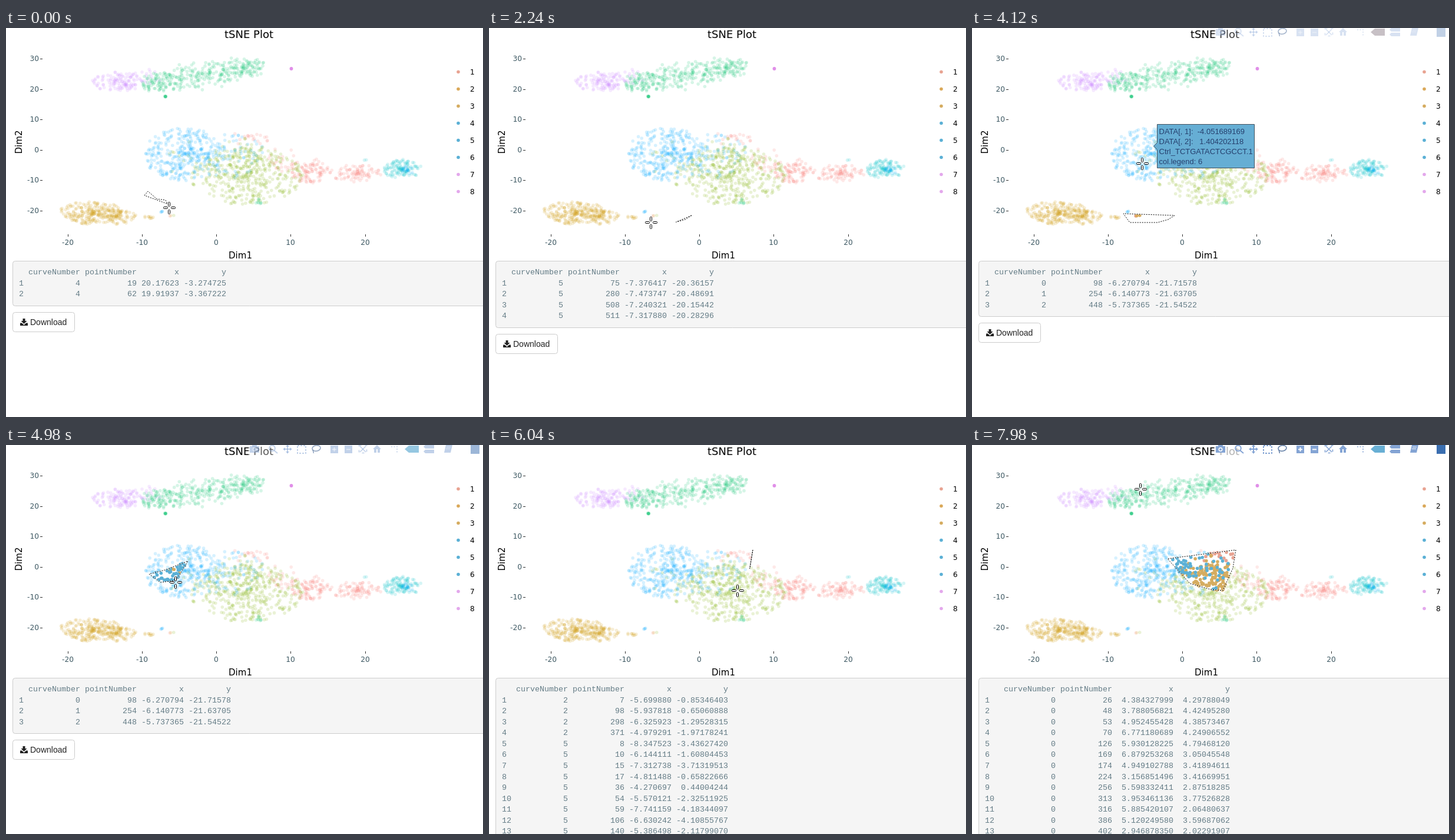
These frames come from a looping animation (810 by 660 pixels, 8 s). An HTML page with a canvas:

```html
<!DOCTYPE html>
<html lang="en">
<head>
<meta charset="utf-8">
<title>tSNE Plot</title>
<style>
  html, body { margin: 0; width: 810px; height: 660px; overflow: hidden; background: #fff; }
  canvas { display: block; }
</style>
</head>
<body>
<canvas id="stage" width="810" height="660"></canvas>
<script>
const ctx = document.getElementById('stage').getContext('2d');
const LOOP = 8000, LAG = 180;
const SANS = '"DejaVu Sans", Verdana, sans-serif';
const ARIAL = '"Liberation Sans", Arial, sans-serif';
const MONO = '"Liberation Mono", "Courier New", monospace';

// Colours per group: faint markers, and the solid ones used for selection and legend
const FAINT = ['', '#F8766D', '#CD9600', '#7CAE00', '#00BE67', '#00BFC4', '#00A9FF', '#C77CFF'];
const SOLID = ['', '#E8A392', '#DAA95A', '#D5AC60', '#5BB0D5', '#5BB0D5', '#5BB0D5', '#E3A8EC', '#E3A8EC'];

const clamp = v => Math.max(0, Math.min(1, v));

// ---------- points, in plot units mapped to pixels ----------
const toX = v => 357.2 + 12.62 * v, toY = v => 206.8 - 5.16 * v;
const fromX = px => (px - 357.2) / 12.62, fromY = px => (206.8 - px) / 5.16;

let seed = 20177;
function rnd() {
  seed = (seed + 0x6D2B79F5) | 0;
  let r = Math.imul(seed ^ (seed >>> 15), 1 | seed);
  r = (r + Math.imul(r ^ (r >>> 7), 61 | r)) ^ r;
  return ((r ^ (r >>> 14)) >>> 0) / 4294967296;
}

// Known points: group, number within the group, x, y
const points = [
  [5, 19, 20.17623, -3.274725], [5, 62, 19.91937, -3.367222],
  [6, 75, -7.376417, -20.36157], [6, 280, -7.473747, -20.48691],
  [6, 508, -7.240321, -20.15442], [6, 511, -7.317880, -20.28296],
  [1, 98, -6.270794, -21.71578], [2, 254, -6.140773, -21.63705], [3, 448, -5.737365, -21.54522]
].map(([g, n, x, y]) => ({ g, n, x, y, px: toX(x), py: toY(y) }));

function dot(g, px, py) {
  points.push({ g, n: Math.floor(rnd() * 520), x: fromX(px), y: fromY(py), px, py });
}
function blob(n, g, cx, cy, rx, ry) {
  while (n--) {
    const a = rnd() * 2 * Math.PI, r = rnd() ** 0.7;
    dot(g, cx + rx * r * Math.cos(a), cy + ry * r * Math.sin(a));
  }
}

blob(110, 7, 189, 91, 43, 17);
blob(20, 7, 236, 84, 27, 17);
for (let i = 0; i < 340; i++) {
  const u = rnd(), half = 28 * Math.sin(Math.PI * (0.15 + 0.68 * u));
  dot(4, 232 + 206 * u, 95 - 31 * u + (rnd() + rnd() - 1) * half);
}
blob(8, 4, 270.5, 116, 1, 1);
blob(20, 1, 410, 187, 38, 12);
blob(20, 1, 468, 226, 34, 24);
blob(100, 1, 515, 243, 38, 22);
blob(90, 1, 592, 246, 46, 15);
blob(210, 2, 145, 313, 54, 20);
blob(80, 2, 188, 319, 33, 14);
blob(9, 2, 241, 322, 10, 3);
blob(400, 3, 408, 250, 96, 50);
blob(45, 3, 397, 214, 46, 31);
blob(10, 3, 287, 216, 42, 30);
blob(340, 6, 304, 214, 70, 45);
blob(60, 6, 385, 216, 54, 42);
blob(120, 5, 672, 239, 34, 16);
blob(14, 6, 681, 242, 10, 8);
blob(8, 4, 430, 292, 8, 7);

// ---------- pointer and lassos: waypoints are evenly spaced in time ----------
const strokes = [
  { from: -1400, to: 700, lasso: true, xy: [235, 284, 241, 277, 256, 290, 271, 292, 277, 305, 277, 318, 267, 320] },
  { from: 900, to: 1530, xy: [267, 320, 344, 318] },
  { from: 1720, to: 2450, lasso: true, xy: [344, 318, 333, 325, 315, 330, 268, 330, 257, 315] },
  { from: 3080, to: 3600, xy: [257, 315, 281, 283, 300, 205] },
  { from: 4000, to: 4120, xy: [300, 205, 289, 230] },
  { from: 4200, to: 4800, lasso: true, xy: [289, 230, 309, 197, 270, 212, 243, 219, 262, 233] },
  { from: 4880, to: 5530, xy: [262, 233, 433, 234] },
  { from: 5530, to: 5650, xy: [433, 234, 448, 178] },
  { from: 5700, to: 6480, lasso: true, xy: [448, 178, 443, 209, 426, 247, 405, 245, 370, 235, 332, 193] },
  { from: 7360, to: 7540, xy: [332, 193, 310, 100] },
  { from: 7840, to: 7980, xy: [310, 100, 286, 75] }
];
const lassos = strokes.filter(s => s.lasso);
const latest = (list, t) => list.filter(s => s.from <= t).pop();

function along({ from, to, xy }, t) {
  const last = xy.length / 2 - 1;
  const pos = clamp((t - from) / (to - from)) * last;
  const i = Math.min(Math.floor(pos), last - 1), u = pos - i;
  const mix = k => xy[2 * i + k] * (1 - u) + xy[2 * i + 2 + k] * u;
  return { i, x: mix(0), y: mix(1) };
}
function lassoPath(stroke, t) {
  const end = along(stroke, t), path = new Path2D();
  for (let i = 0; i <= end.i; i++) path.lineTo(stroke.xy[2 * i], stroke.xy[2 * i + 1]);
  path.lineTo(end.x, end.y);
  path.closePath();
  return path;
}
const inside = path => p => ctx.isPointInPath(path, p.px, p.py);

// ---------- tables of the selected points ----------
function makeTable(from, chosen, xDigits, yDigits) {
  const rows = chosen.sort((a, b) => a.g - b.g || a.n - b.n).map(p =>
    [String(p.g - 1), String(p.n), p.x.toFixed(xDigits), p.y.toFixed(yDigits)]);
  const heads = ['curveNumber', 'pointNumber', 'x', 'y'];
  const widths = heads.map((h, c) => 1 + Math.max(h.length, ...rows.map(r => r[c].length)));
  const nameWidth = String(rows.length).length;
  const line = (name, cells) => name.padEnd(nameWidth) + cells.map((s, c) => s.padStart(widths[c])).join('');
  return { from, lines: [line('', heads), ...rows.map((r, i) => line(String(i + 1), r))].slice(0, 14) };
}
const selection = k => points.filter(inside(lassoPath(lassos[k], LOOP)));
const tables = [
  makeTable(0, points.slice(0, 2), 5, 6),
  makeTable(1100, selection(0), 6, 5),
  makeTable(3150, selection(1), 6, 5),
  makeTable(5200, selection(2), 6, 8),
  makeTable(7000, selection(3), 9, 8)
];

// ---------- hover labels ----------
const GREEN = ['#30C55A', '#7A3030', '#4A4A35'];
const TAN = ['#DCAC66', '#66402F', '#7A3A20'];
const BLUE = ['#66AED4', '#26406E', '#44525E'];
const labels = [
  [1000, 1660, 287, 318, GREEN, '-5.737364522', '-21.545221061', 'TAAGGGCTGCTGTA', 3],
  [3150, 3450, 254, 316, TAN, '-8.348908656', '-21.198315423', 'GGAGAGACGTGAGG', 2],
  [3520, 4140, 308, 200, BLUE, '-4.051689169', '1.404202118', 'TCTGATACTCGCCT', 6],
  [5000, 5640, 268, 249, GREEN, '-7.222394265', '-8.231920606', 'TGATCACTCTCGCT', 3],
  [7450, 7880, 338, 64, GREEN, '-1.527318046', '27.640915238', 'GATTACCTGACTCA', 4]
];

// ---------- drawing helpers ----------
function text(s, x, y, font, color, align = 'left') {
  ctx.font = font;
  ctx.fillStyle = color;
  ctx.textAlign = align;
  ctx.fillText(s, x, y);
}
function disc(x, y, r, color) {
  ctx.fillStyle = color;
  ctx.beginPath();
  ctx.arc(x, y, r, 0, 7);
  ctx.fill();
}
function poly(...xy) {
  ctx.beginPath();
  for (let i = 0; i < xy.length; i += 2) ctx.lineTo(xy[i], xy[i + 1]);
  ctx.closePath();
  ctx.fill();
}
function seg(x0, y0, x1, y1) {
  ctx.beginPath();
  ctx.moveTo(x0, y0);
  ctx.lineTo(x1, y1);
  ctx.stroke();
}
function panel(x, y, w, h, fill, stroke, r) {
  ctx.beginPath();
  ctx.roundRect(x + 0.5, y + 0.5, w, h, r);
  ctx.fillStyle = fill;
  ctx.fill();
  ctx.strokeStyle = stroke;
  ctx.lineWidth = 1;
  ctx.stroke();
}
function dashed(shape, ...dash) {
  ctx.setLineDash(dash);
  shape();
  ctx.setLineDash([]);
}

function drawAxes() {
  const tick = '12.2px ' + SANS, ink = '#3F5A64';
  text('tSNE Plot', 412.5, 17, '18px ' + SANS, '#000', 'center');
  text('Dim1', 398, 391, '15px ' + SANS, '#000', 'center');
  ctx.save();
  ctx.translate(27, 193.5);
  ctx.rotate(-Math.PI / 2);
  text('Dim2', 0, 0, '15px ' + SANS, '#000', 'center');
  ctx.restore();
  for (let v = -20; v <= 30; v += 10) {
    const x = Math.round(toX(v)), y = Math.round(toY(v));
    text(v, 56, y + 4, tick, ink, 'right');
    ctx.fillStyle = '#333';
    ctx.fillRect(58, y, 4, 1);
    if (v > 20) continue;
    ctx.fillRect(x, 350, 1, 4);
    text(v, x, 368, tick, ink, 'center');
  }
  for (let g = 1; g <= 8; g++) {
    const y = 45.5 + 29 * g;
    disc(768, y, 2.8, SOLID[g]);
    text(g, 788, y + 4.5, tick, '#000');
  }
}

function drawPoints(path) {
  const picked = points.filter(inside(path));
  ctx.globalAlpha = 0.16;
  for (const p of points) if (!picked.includes(p)) disc(p.px, p.py, 2.8, FAINT[p.g]);
  ctx.globalAlpha = 1;
  disc(484.5, 69, 2.9, '#E08FE8');
  for (const p of picked) disc(p.px, p.py, 2.8, SOLID[p.g]);
}

function drawLasso(path) {
  ctx.lineWidth = 1;
  ctx.strokeStyle = '#fff';
  ctx.stroke(path);
  ctx.strokeStyle = '#000';
  dashed(() => ctx.stroke(path), 2, 2);
}

function drawTable(t) {
  const { lines } = latest(tables, t);
  const h = Math.round(20 + 18.57 * lines.length);
  panel(11, 395, 820, h, '#F5F5F5', '#CCC', 4);
  lines.forEach((s, i) => text(s, 22, Math.round(418 + 18.57 * i), '13.33px ' + MONO, '#647C86'));

  const y = 406 + h;
  panel(11, y, 105, 33, '#fff', '#CCC', 4);
  text('Download', 41, y + 22, '14px ' + ARIAL, '#222');
  ctx.fillStyle = '#222';
  ctx.fillRect(28.5, y + 11, 4, 5);
  poly(25.5, y + 15, 35.5, y + 15, 30.5, y + 20);
  poly(24, y + 18.5, 27, y + 18.5, 30.5, y + 22, 34, y + 18.5, 37, y + 18.5, 37, y + 23, 24, y + 23);
}

function modebarAlpha(t) {
  const spans = [[900, 1720], [3080, 4010], [4880, 5690], [6960, 9000]];
  return Math.max(...spans.map(([a, b]) => Math.min(clamp((t - a) / 200), clamp(1 - (t - b) / 160))));
}

function drawModebar(t) {
  const alpha = modebarAlpha(t);
  if (!alpha) return;
  ctx.save();
  ctx.globalAlpha = alpha;
  ctx.fillStyle = 'rgba(255,255,255,0.7)';
  ctx.fillRect(411, 0, 399, 20);
  const ink = '#84A4D4';
  ctx.fillStyle = ctx.strokeStyle = ink;
  ctx.lineWidth = 2;
  // camera
  ctx.fillRect(414, 2, 16, 11);
  ctx.fillRect(418, 0, 8, 3);
  disc(422, 7.5, 3.5, '#fff');
  disc(422, 7.5, 2, ink);
  // zoom
  ctx.beginPath();
  ctx.arc(452, 5.5, 4.8, 0, 7);
  ctx.stroke();
  seg(455, 9, 461, 14);
  // pan
  seg(472, 7, 484, 7);
  seg(478, 1, 478, 13);
  for (const s of [-1, 1]) {
    poly(478 + 8 * s, 7, 478 + 4 * s, 4, 478 + 4 * s, 10);
    poly(478, 7 + 8 * s, 475, 7 + 4 * s, 481, 7 + 4 * s);
  }
  // box select
  dashed(() => ctx.strokeRect(495, 1, 14, 13), 3, 2);
  // zoom in and out
  for (const x of [551, 575]) {
    ctx.fillStyle = ink;
    ctx.fillRect(x, 1, 13, 13);
    ctx.fillStyle = '#fff';
    ctx.fillRect(x + 3, 6.5, 7, 2);
  }
  ctx.fillRect(556.5, 4, 2, 7);
  ctx.fillStyle = ink;
  // autoscale
  ctx.lineWidth = 1.6;
  seg(601, 2, 611, 12);
  seg(611, 2, 601, 12);
  dashed(() => ctx.strokeRect(599.5, 0.5, 13, 13), 4, 6);
  // home
  poly(623, 7, 630, 0, 637, 7);
  ctx.fillRect(625, 7, 4, 6);
  ctx.fillRect(631, 7, 4, 6);
  // spike lines
  dashed(() => { seg(654, 3, 665, 3); seg(664, 6, 664, 13); }, 2, 2.5);
  // compare labels
  for (const y of [0, 8]) poly(709, y + 3, 712, y, 727, y, 727, y + 6, 712, y + 6);
  // book
  poly(747, 0, 758, 0, 755, 13, 744, 13);
  ctx.fillStyle = '#fff';
  ctx.fillRect(748, 3, 7, 1);
  ctx.fillRect(747, 6, 7, 1);
  ctx.fillStyle = '#3A6EB0';
  ctx.fillRect(789, 0, 15, 15);
  // the two active buttons
  ctx.globalAlpha = 0.4 + 0.6 * alpha;
  ctx.strokeStyle = '#6681A8';
  ctx.beginPath();
  ctx.ellipse(527, 5.5, 7, 4.8, -0.15, 0, 7);
  ctx.stroke();
  seg(521, 8, 522.5, 14);
  ctx.fillStyle = t > 3080 && t < 4300 ? '#9F949C' : '#68AFD4';
  poly(677, 7, 684, 1, 701, 1, 701, 13, 684, 13);
  ctx.restore();
}

function drawLabel(t) {
  const hit = labels.find(l => t >= l[0] && t < l[1]);
  if (!hit) return;
  const [, , tipX, tipY, [fill, ink, edge], x, y, cell, group] = hit;
  const lines = ['DATA[, 1]: ' + x.padStart(13), 'DATA[, 2]: ' + y.padStart(13),
    `Ctrl_${cell}.1`, 'col.legend: ' + group];
  const font = '13px ' + ARIAL;
  ctx.font = font;
  const w = Math.round(Math.max(...lines.map(s => ctx.measureText(s).width)) + 6);
  const left = tipX + 6.5, top = tipY - 36.5, bottom = tipY + 37.5;
  ctx.fillStyle = fill;
  poly(tipX + 0.5, tipY + 0.5, left, tipY - 5.5, left, top, left + w, top,
    left + w, bottom, left, bottom, left, tipY + 6.5);
  ctx.strokeStyle = edge;
  ctx.lineWidth = 1;
  ctx.stroke();
  lines.forEach((s, i) => text(s, left + 3, top + 16 + 17 * i, font, ink));
}

function drawPointer(t) {
  const at = along(latest(strokes, t), t);
  const x = Math.round(at.x), y = Math.round(at.y);
  for (const d of [-10, 3]) {
    panel(x - 2, y + d, 3, 7, '#fff', '#000', 1);
    panel(x + d, y - 2, 7, 3, '#fff', '#000', 1);
  }
}

function draw(t) {
  ctx.fillStyle = '#fff';
  ctx.fillRect(0, 0, 810, 660);
  const path = lassoPath(latest(lassos, t - LAG), t - LAG);
  drawAxes();
  drawPoints(path);
  drawLasso(path);
  drawTable(t);
  drawModebar(t);
  drawLabel(t);
  drawPointer(t);
}

let begin;
function tick(now) {
  begin ??= now;
  draw((now - begin) % LOOP);
  requestAnimationFrame(tick);
}
draw(0);
requestAnimationFrame(tick);
</script>
</body>
</html>
```
